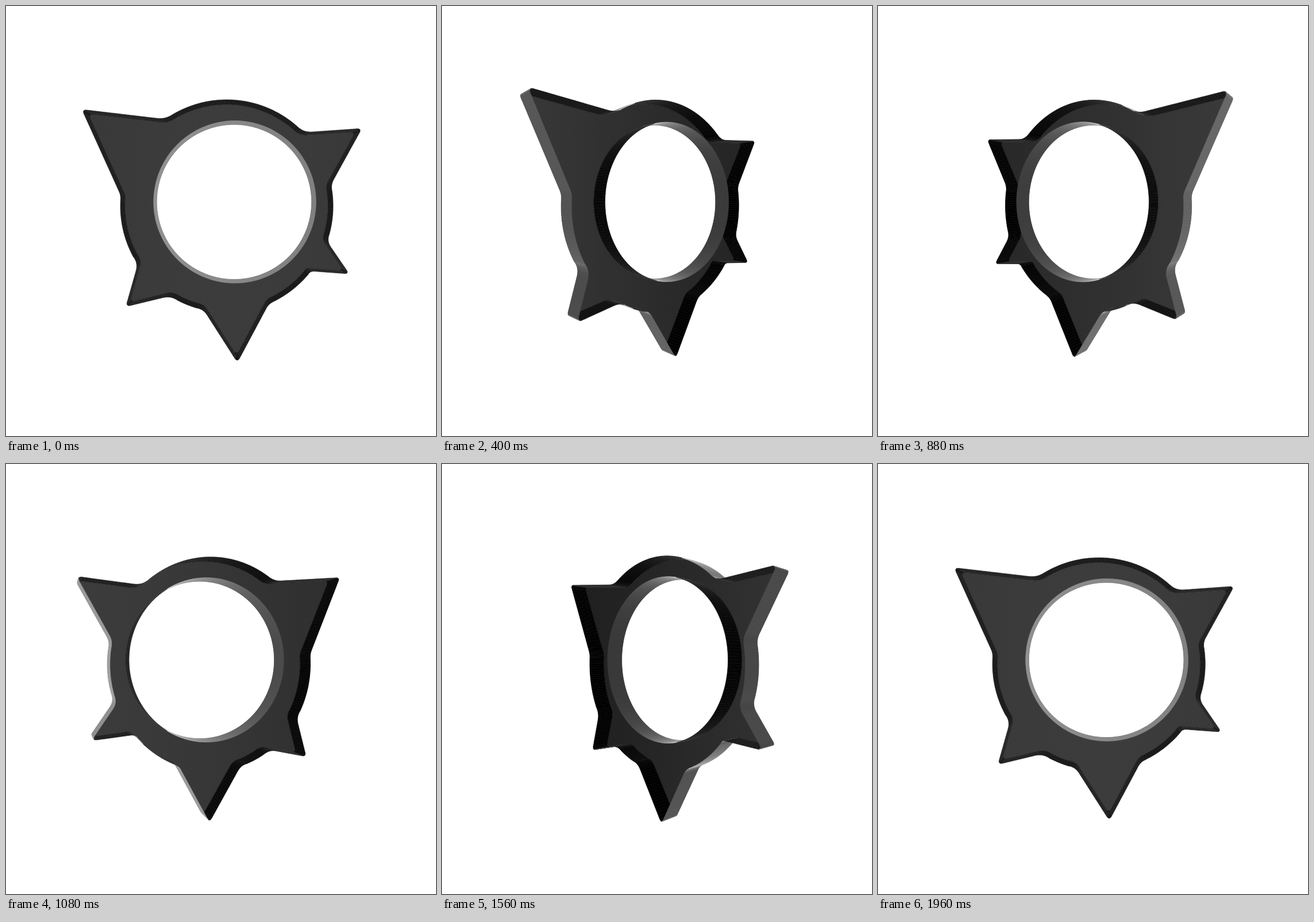
An HTML page with a canvas that plays this animation: 748x748 px, repeating every 2000 ms.

```html
<!DOCTYPE html>
<html lang="en">
<head>
<meta charset="utf-8">
<title>Spinning spiked ring</title>
<style>
  html, body { margin: 0; width: 100%; height: 100%; overflow: hidden; background: #fff; }
  canvas { display: block; width: 748px; height: 748px; }
</style>
</head>
<body>
<canvas id="stage" width="748" height="748"></canvas>
<script>
const ctx = document.getElementById('stage').getContext('2d');
const SIZE = 748, MID = SIZE / 2;
const LOOP = 2000, STEP = 40;
const DIST = 735;            // camera distance, also focal length
const HALF = 17.75;          // half of the ring's thickness
const PITCH = 0.044;         // camera looks slightly down
const CP = Math.cos(PITCH), SP = Math.sin(PITCH);
const RING = { x: 384, y: 348, r: 185 };
const HOLE = { x: 398, y: 340.8, r: 141.3 };

// Spikes clockwise: base start, tip, base end, each as [x, y, corner trim]
const SPIKES = [
  [[200, 330, 8], [132, 180, 9], [277, 197, 14]],
  [[518, 220, 14], [619, 213, 9], [565, 311, 10]],
  [[558, 409, 12], [597, 466, 9], [529, 461, 7]],
  [[457, 518, 9], [402.5, 620, 9], [343, 527, 12]],
  [[287, 504, 14], [208.5, 523, 9], [230, 447, 14]]
];

function arcPoints(c, from, to, step) {
  const n = Math.max(1, Math.ceil((to - from) / step)), out = [];
  for (let i = 0; i <= n; i++) {
    const a = from + (to - from) * i / n;
    out.push([c.x + c.r * Math.cos(a), c.y + c.r * Math.sin(a), 0]);
  }
  return out;
}

function outerCorners() {
  const angle = p => Math.atan2(p[1] - RING.y, p[0] - RING.x);
  const out = [];
  SPIKES.forEach((s, i) => {
    out.push(...s);
    const end = s[2], next = SPIKES[(i + 1) % SPIKES.length][0];
    const a = angle(end);
    let b = angle(next);
    if (b < a) b += Math.PI * 2;
    out.push(...arcPoints(RING, a + end[2] / RING.r, b - next[2] / RING.r, 0.025));
  });
  return out;
}

function towards(p, q, d) {
  const k = d / Math.hypot(q[0] - p[0], q[1] - p[1]);
  return [p[0] + (q[0] - p[0]) * k, p[1] + (q[1] - p[1]) * k];
}

function roundCorners(pts) {
  const out = [], n = pts.length;
  pts.forEach((p, i) => {
    if (!p[2]) { out.push([p[0], p[1]]); return; }
    const a = towards(p, pts[(i + n - 1) % n], p[2]);
    const b = towards(p, pts[(i + 1) % n], p[2]);
    for (let k = 0; k <= 8; k++) {
      const t = k / 8, u = 1 - t;
      out.push([0, 1].map(j => u * u * a[j] + 2 * u * t * p[j] + t * t * b[j]));
    }
  });
  return out;
}

function subdivide(pts, max) {
  const out = [];
  pts.forEach((p, i) => {
    const q = pts[(i + 1) % pts.length];
    const len = Math.hypot(q[0] - p[0], q[1] - p[1]);
    if (len < 0.01) return;
    const n = Math.ceil(len / max);
    for (let k = 0; k < n; k++) {
      out.push([p[0] + (q[0] - p[0]) * k / n, p[1] + (q[1] - p[1]) * k / n]);
    }
  });
  return out;
}

// Screen position on the front face, seen head-on, to model coordinates
function unproject([sx, sy]) {
  const dx = sx - MID, dy = sy - MID;
  const k = (DIST * CP - HALF) / (DIST * CP - dy * SP);
  return [dx * k, dy * k * CP - DIST * (1 - k) * SP];
}

const outer = subdivide(roundCorners(outerCorners()), 5).map(unproject);
const inner = subdivide(arcPoints(HOLE, 0, Math.PI * 2 * 179 / 180, Math.PI / 90), 6).map(unproject);

// Wall pieces with the normal that points out of the solid
function wallsOf(loop, side) {
  return loop.map((a, i) => {
    const j = (i + 1) % loop.length, b = loop[j];
    const len = Math.hypot(b[0] - a[0], b[1] - a[1]) || 1;
    return {
      loop, i, j,
      mx: (a[0] + b[0]) / 2, my: (a[1] + b[1]) / 2,
      nx: side * (b[1] - a[1]) / len, ny: -side * (b[0] - a[0]) / len
    };
  });
}
const walls = [...wallsOf(outer, 1), ...wallsOf(inner, -1)];

const gray = v => {
  const g = Math.round(Math.max(0, Math.min(255, v)));
  return `rgb(${g},${g},${g})`;
};

function wallShade(nv) {
  const rim = Math.pow(1 - Math.abs(nv), 3);
  return nv > 0 ? 56 + 150 * rim : 60 * rim;
}

function draw(turn) {
  const c = Math.cos(turn), s = Math.sin(turn);
  const eye = { x: -DIST * CP * s, y: -DIST * SP, z: DIST * CP * c };

  const project = (x, y, z) => {
    const wx = x * c + z * s, wz = z * c - x * s;
    const k = DIST / (DIST - wz * CP + y * SP);
    return [MID + wx * k, MID + (y * CP + wz * SP) * k];
  };
  const flat = (loop, z) => loop.map(p => project(p[0], p[1], z));
  const shapes = new Map([outer, inner].map(l => [l, { front: flat(l, HALF), back: flat(l, -HALF) }]));

  const trace = pts => {
    pts.forEach((p, i) => i ? ctx.lineTo(p[0], p[1]) : ctx.moveTo(p[0], p[1]));
    ctx.closePath();
  };

  // A cap shows only its inner side
  const cap = (z, key) => {
    const g = ctx.createLinearGradient(project(-230, 0, z)[0], 0, project(235, 0, z)[0], 0);
    for (let i = 0; i <= 4; i++) {
      const x = -230 + 465 * i / 4;
      const nv = Math.abs(eye.z - z) / Math.hypot(eye.x - x, eye.y, eye.z - z);
      g.addColorStop(i / 4, gray(60 * Math.pow(nv, 1.2)));
    }
    ctx.fillStyle = g;
    ctx.beginPath();
    trace(shapes.get(outer)[key]);
    trace(shapes.get(inner)[key]);
    ctx.fill('evenodd');
  };

  ctx.fillStyle = '#fff';
  ctx.fillRect(0, 0, SIZE, SIZE);
  if (eye.z < HALF) cap(HALF, 'front');
  if (eye.z > -HALF) cap(-HALF, 'back');

  for (const w of walls) w.d = Math.hypot(eye.x - w.mx, eye.y - w.my);
  walls.sort((a, b) => b.d - a.d);
  ctx.lineWidth = 0.6;
  ctx.lineJoin = 'round';
  for (const w of walls) {
    const { front, back } = shapes.get(w.loop);
    const dx = eye.x - w.mx, dy = eye.y - w.my;
    const nv = (w.nx * dx + w.ny * dy) / Math.hypot(dx, dy, eye.z);
    ctx.fillStyle = ctx.strokeStyle = gray(wallShade(nv));
    ctx.beginPath();
    trace([front[w.i], front[w.j], back[w.j], back[w.i]]);
    ctx.fill();
    ctx.stroke();
  }
}

let shown = -1;
function tick() {
  const step = Math.floor((performance.now() % LOOP) / STEP);
  if (step !== shown) {
    shown = step;
    const t = step * STEP / LOOP;
    draw(Math.PI * 2 * t * t * (3 - 2 * t));
  }
  requestAnimationFrame(tick);
}
tick();
</script>
</body>
</html>
```
